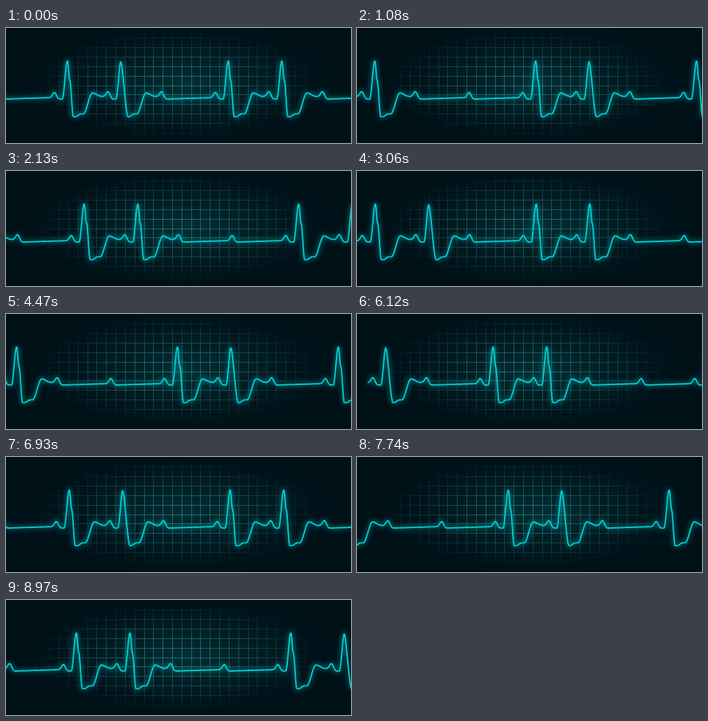
An HTML page for the animation above (9 s loop, 432 px wide and 144 px high).

```html
<!DOCTYPE html>
<html lang="en">
<head>
<meta charset="utf-8">
<title>Heart rhythm</title>
<style>
  html, body { margin: 0; width: 100%; height: 100%; overflow: hidden; background: #001017; }
  svg { display: block; width: 100vw; height: 100vh; }
</style>
</head>
<body>
<svg viewBox="0 0 432 144" xmlns="http://www.w3.org/2000/svg">
  <defs>
    <radialGradient id="halo" gradientUnits="userSpaceOnUse" cx="0" cy="0" r="1"
      gradientTransform="translate(226 70) scale(205 82)">
      <stop offset="0" stop-color="#002f34"/>
      <stop offset=".35" stop-color="#002026"/>
      <stop offset=".7" stop-color="#00141b"/>
      <stop offset="1" stop-color="#001017"/>
    </radialGradient>
    <radialGradient id="fade" gradientUnits="userSpaceOnUse" cx="0" cy="0" r="1"
      gradientTransform="translate(212 70) scale(180 68)">
      <stop offset="0" stop-color="#fff"/>
      <stop offset=".4" stop-color="#aaa"/>
      <stop offset=".75" stop-color="#4a4a4a"/>
      <stop offset="1" stop-color="#000"/>
    </radialGradient>
    <mask id="vignette" maskUnits="userSpaceOnUse" x="0" y="0" width="432" height="144">
      <rect width="432" height="144" fill="url(#fade)"/>
    </mask>
    <filter id="blur" filterUnits="userSpaceOnUse" x="-500" y="0" width="1500" height="144">
      <feGaussianBlur stdDeviation="3"/>
    </filter>
    <path id="wave" fill="none" stroke-linecap="round" stroke-linejoin="round"/>
  </defs>
  <rect width="432" height="144" fill="url(#halo)"/>
  <path id="grid" mask="url(#vignette)" stroke="#2a6c6d"/>
  <g id="trace">
    <use href="#wave" stroke="#00a0a8" stroke-width="4" opacity=".55" filter="url(#blur)"/>
    <use href="#wave" stroke="#00d0d2" stroke-width="1.7"/>
  </g>
</svg>
<script>
const LOOP = 9000, STEP = 30;
const SPEED = 0.136;       // px per ms, to the right
const BEAT = 67.15;
const START = 76.8;        // first peak at time zero
const RHYTHM = 'AB-AA--';  // notched beat, plain beat, dropped beat
const PERIOD = BEAT * RHYTHM.length;
const LEAD = 22;           // part of each beat before its peak

const ramp = (x, from, to) => {
  const k = Math.min(1, Math.max(0, (x - from) / (to - from)));
  return k * k * (3 - 2 * k);
};
const bell = (x, width) => Math.exp(-x * x / (2 * width * width));

// Height of the trace at x px from the peak of a beat.
function beatHeight(x, kind, previous) {
  const rest = previous === '-' ? 87.2 : 85.6;
  const y = rest + (89 - rest) * ramp(x, -20, -10) - 7 * bell(x + 16, 2.3);
  if (kind === '-') return y - 1.8 * Math.max(0, x + 10) / (BEAT - LEAD + 10);
  const fall = kind === 'A'
    ? 24 * ramp(x, 0.2, 3) + 45.6 * ramp(x, 3, 7.5)
    : 69.6 * ramp(x, -0.8, 9);
  const recovery = 3.5 * ramp(x, 10, 17) + 26.3 * ramp(x, 20, 31.5);
  return y - 47.6 * ramp(x, -6.3, 0) + fall - recovery + 4.4 * ramp(x, 31, 43);
}

const beatAt = i => RHYTHM[(i + RHYTHM.length) % RHYTHM.length];

function waveHeight(x) {
  const i = Math.floor((x + LEAD) / BEAT);
  return beatHeight(x - i * BEAT, beatAt(i), beatAt(i - 1));
}

const points = [];
for (let x = -PERIOD - LEAD + BEAT; x < PERIOD; x += 0.5) {
  points.push(`${x.toFixed(2)} ${waveHeight(x).toFixed(2)}`);
}
document.getElementById('wave').setAttribute('d', 'M' + points.join('L'));

// Grid lines sit on whole pixels.
const snap = v => Math.floor(v) + 0.5;
let lines = '';
for (let x = 7.6; x < 432; x += 11.82) lines += `M${snap(x)} 0V144`;
for (let y = 1.05; y < 144; y += 11.83) lines += `M0 ${snap(y)}H432`;
document.getElementById('grid').setAttribute('d', lines);

const trace = document.getElementById('trace');
function draw(ms) {
  const t = Math.floor((ms % LOOP) / STEP) * STEP;
  const x = (START + SPEED * t) % PERIOD;
  trace.setAttribute('transform', `translate(${x.toFixed(2)} 0)`);
}

const begin = performance.now();
function tick() {
  draw(performance.now() - begin);
  requestAnimationFrame(tick);
}
tick();
</script>
</body>
</html>
```
